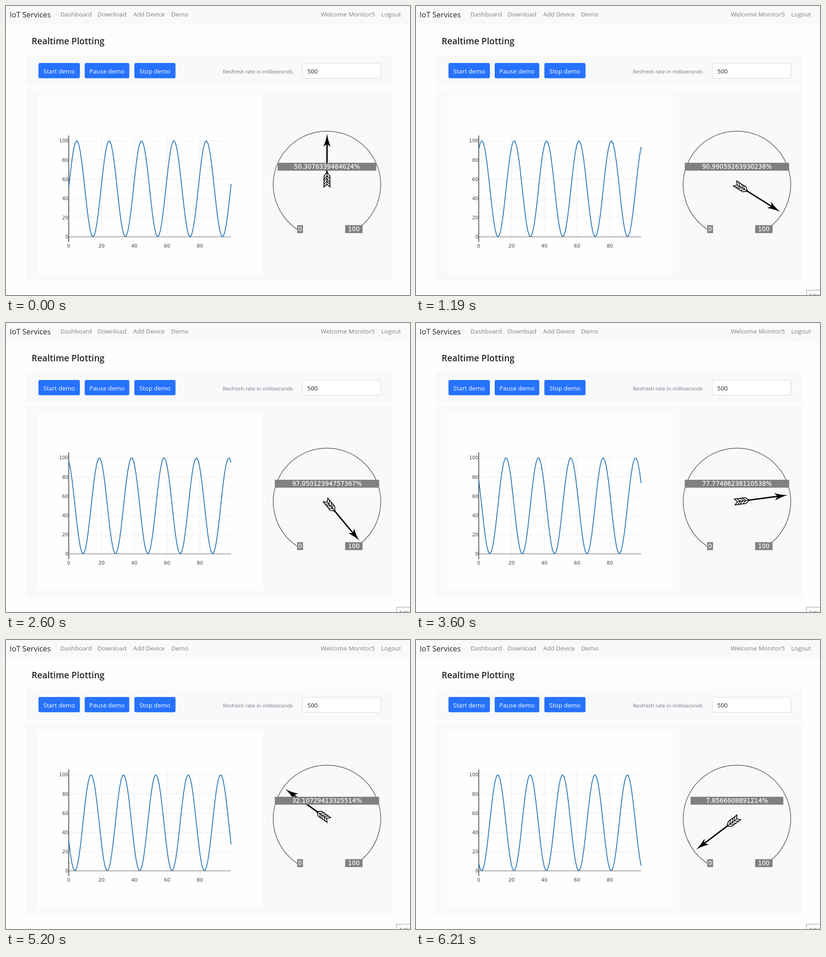
Recreate the animation shown at these times as an HTML page. Size 883 by 634 pixels, loop 6610 ms.

```html
<!DOCTYPE html>
<html lang="en">
<head>
<meta charset="utf-8">
<title>Realtime Plotting</title>
<style>
  html, body { margin: 0; width: 100%; height: 100%; overflow: hidden; background: #fefefe; }
  svg { display: block; width: 883px; height: 634px; }
  text { font: 13.35px "Open Sans", "Noto Sans", sans-serif; fill: #212529; }
  .panel { fill: #f8f9fb; }
  .brand { font-size: 16.4px; }
  .nav text { fill: #7f8184; }
  .title { font-size: 19.2px; font-weight: 600; }
  .btn rect { fill: #2672ff; }
  .btn text { fill: #fff; text-anchor: middle; }
  .hint { font-size: 11.5px; fill: #6f757b; }
  .field { fill: #fff; stroke: #d3d8dd; }
  .grid { stroke: #eee; stroke-width: 1.2; }
  .tick { font: 10.7px "DejaVu Sans", sans-serif; fill: #444; }
  .curve { fill: none; stroke: #2775b4; stroke-width: 1.8; stroke-linejoin: round; }
  .dial { fill: none; stroke: #666; stroke-width: 1.5; }
  .tag rect { fill: #808080; }
  .tag text { font: 13.3px "DejaVu Sans", sans-serif; fill: #f4f4f4; stroke: #f4f4f4; stroke-width: .3; text-anchor: middle; }
  .tip rect { fill: #fff; stroke: #999; }
  .tip text { font-size: 11px; fill: #555; }
</style>
</head>
<body>
<svg viewBox="0 0 883 634">
  <rect class="panel" width="883" height="41.5"/>
  <text class="brand" x="8" y="24.5">IoT Services</text>
  <g class="nav">
    <text x="119" y="23">Dashboard</text>
    <text x="200" y="23">Download</text>
    <text x="278" y="23">Add Device</text>
    <text x="361" y="23">Demo</text>
    <text x="688" y="23">Welcome Monitor5</text>
    <text x="820" y="23">Logout</text>
  </g>
  <text class="title" x="56" y="83.5">Realtime Plotting</text>

  <rect class="panel" x="43" y="108" width="801" height="68"/>
  <g class="btn">
    <rect x="71" y="125" width="90.5" height="33.5" rx="3.5"/><text x="116.2" y="147.5">Start demo</text>
    <rect x="172" y="125" width="97.5" height="33.5" rx="3.5"/><text x="220.7" y="147.5">Pause demo</text>
    <rect x="280.5" y="125" width="90" height="33.5" rx="3.5"/><text x="325.5" y="147.5">Stop demo</text>
  </g>
  <text class="hint" x="474" y="148">Resfresh rate in milliseconds</text>
  <rect class="field" x="647.5" y="125.5" width="172" height="33" rx="3.5"/>
  <text x="658.5" y="147.5">500</text>

  <rect class="panel" x="43" y="182.5" width="801" height="419.5"/>
  <rect x="68" y="197" width="493.5" height="390.5" fill="#fefefe"/>
  <g id="axes"></g>
  <path d="M137 506.5H492" stroke="#909090" stroke-width="1.6"/>
  <path d="M137.2 284V518" stroke="#444" stroke-width="1.6"/>
  <path id="curve" class="curve"/>

  <path class="dial" d="M642.8 493.8A117.5 117.5 0 1 1 760.2 493.8"/>
  <g id="arrow" stroke="#000" fill="none">
    <path d="M0-112C1-102 4-93 8-83L2-88H-2L-8-83C-4-93-1-102 0-112Z" fill="#000" stroke="none"/>
    <path d="M0-92V-24" stroke-width="3"/>
    <path d="M0-27L-6.5-19V5L0-1L6.5 5V-19Z" stroke-width="1.7"/>
    <path d="M0-24V-2M0-20L-6-13M0-15L-6-8M0-8L-6-1M0-20L6-13M0-13L6-6M0-8L6-1" stroke-width="1.4"/>
  </g>
  <g class="tag" id="low"><rect/><text/></g>
  <g class="tag" id="high"><rect/><text/></g>
  <g class="tag" id="value"><rect/><text/></g>

  <g class="tip" id="tip">
    <rect x="853.5" y="623.5" width="60" height="20"/>
    <text x="859" y="638.5">Active</text>
  </g>
</svg>
<script>
  const LOOP = 6610, TIP_AT = 590;
  const steps = [200, 790, 1190, 1800, 2200, 2600, 3200, 3600, 4200, 4600, 5200, 5610, 6210];
  const phase = Math.asin((50.3076339484624 - 50) / 50);
  const $ = id => document.getElementById(id);
  const px = i => 137 + i * 3.586;
  const py = v => 506.5 - v * 2.11;
  const sample = i => 50 + 50 * Math.sin(phase + i / Math.PI);

  function setTag(id, label, x, y) {
    const [box, text] = $(id).children;
    const w = label.length * 12.67;
    const set = (el, attrs) => Object.entries(attrs).forEach(a => el.setAttribute(...a));
    set(box, { x: x - w / 2, y: y - 8.7, width: w, height: 17.4 });
    set(text, { x, y: y + 4.8 });
    text.textContent = label;
  }

  function drawAxes() {
    let out = '';
    for (let v = 0; v <= 100; v += 20) {
      const x = px(v), y = py(v);
      if (v) out += `<path class="grid" d="M137 ${y}H492"/>`;
      if (v && v < 100) out += `<path class="grid" d="M${x} 284V518"/>`;
      out += `<text class="tick" x="136.3" y="${y + 3.9}" text-anchor="end">${v}</text>`;
      if (v < 100) out += `<text class="tick" x="${x}" y="529.7" text-anchor="middle">${v}</text>`;
    }
    $('axes').innerHTML = out;
  }

  function show(n) {
    const points = Array.from({ length: 100 }, (_, i) =>
      px(i).toFixed(2) + ' ' + py(sample(n + i)).toFixed(2));
    const v = sample(n);
    $('curve').setAttribute('d', 'M' + points.join('L'));
    // 0..100 % sweeps 300 degrees; the arrow itself leans slightly left
    $('arrow').setAttribute('transform', `translate(701.5 392) rotate(${v * 3 - 150.8})`);
    setTag('value', +v.toFixed(14) + '%', 701.5, 352.6);
  }

  let current = -1;
  function tick() {
    const t = performance.now() % LOOP;
    const n = steps.filter(s => s <= t).length;
    if (n !== current) show(current = n);
    $('tip').style.visibility = t < TIP_AT ? 'hidden' : 'visible';
    requestAnimationFrame(tick);
  }

  drawAxes();
  setTag('low', '0', 642.8, 489.5);
  setTag('high', '100', 760.3, 489.5);
  tick();
</script>
</body>
</html>
```
